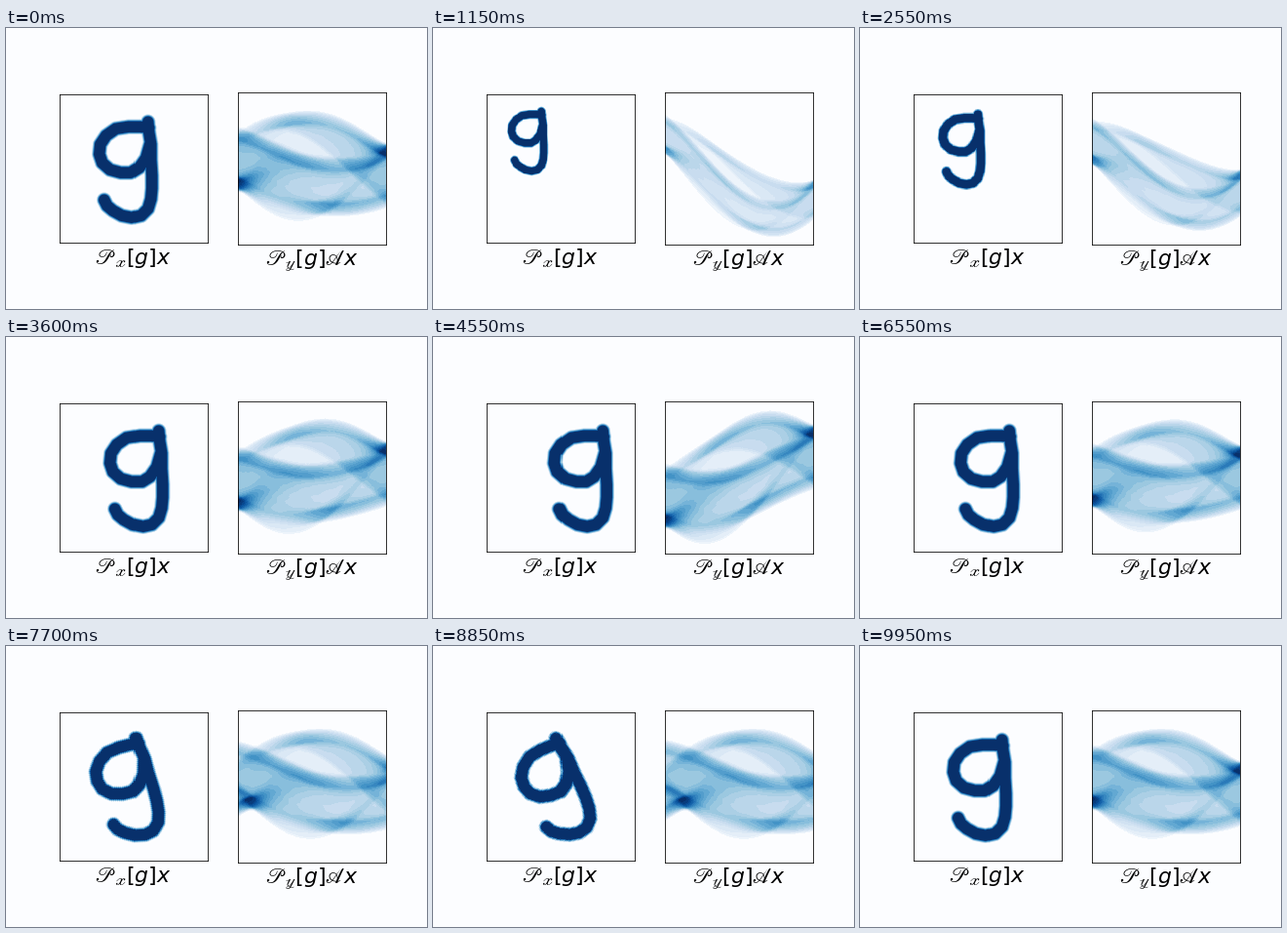
Recreate the animation shown at these times as a matplotlib script. Size 432 px wide and 288 px high, loop 10 s.

```python
import numpy as np
import matplotlib.pyplot as plt
from matplotlib.animation import FuncAnimation
from matplotlib.colors import ListedColormap, to_rgba

W, H, DPI = 432, 288, 72
FRAMES, INTERVAL = 200, 50
PAPER = "#fcfdff"
N, ROWS = 152, 156            # image side, detector rows
HALF = N / 2
STEP = 0.5                    # spacing of the fine glyph grid
ANG0, ANG_STEP = -40, 0.5     # first angle and spacing of the base sinogram
U_MAX = 110
CENTER = np.array([131, 143.5])

plt.rcParams["mathtext.fontset"] = "dejavusans"

BOWL = [(146, 103), (137, 102), (126, 102), (113, 104), (103, 111),
        (97, 120), (96, 130), (99, 139), (107, 146), (118, 149),
        (128, 149), (136, 144), (143, 134), (147, 120)]
STEM = [(145, 97), (146, 108), (148, 120), (148, 136), (149, 152),
        (149, 165), (148, 176), (145, 186), (138, 193), (129, 195),
        (119, 193), (110, 188), (104, 183), (101, 177)]


def seg_dist(x, y, p, q):
    """Distance from every point (x, y) to the segment p-q."""
    d = q - p
    k = ((x - p[0]) * d[0] + (y - p[1]) * d[1]) / (d @ d)
    k = np.clip(k, 0, 1)
    return np.hypot(x - p[0] - k * d[0], y - p[1] - k * d[1])


def draw_glyph(radius=6.7, soft=3.0):
    side = np.arange(-HALF, HALF, STEP) + STEP / 2
    x, y = np.meshgrid(side, side)
    dist = np.full(x.shape, 1e3)
    for path in (BOWL, STEM):
        pts = np.array(path) - CENTER
        for p, q in zip(pts[:-1], pts[1:]):
            dist = np.minimum(dist, seg_dist(x, y, p, q))
    return x, y, np.clip((radius - dist) / soft + 0.5, 0, 1)


def project(x, y, value):
    """Parallel-beam projections of the glyph, one column per angle."""
    on = value > 0
    x, y, w = x[on], y[on], value[on] * STEP**2
    angles = np.radians(np.arange(ANG0, 180 + ANG_STEP, ANG_STEP))
    size = 2 * U_MAX + 1
    out = np.zeros((size, len(angles)))
    for i, t in enumerate(angles):
        u = x * np.cos(t) - y * np.sin(t) + U_MAX
        low = np.floor(u).astype(int)
        f = u - low
        out[:, i] = (np.bincount(low, w * (1 - f), size)
                     + np.bincount(low + 1, w * f, size))
    return out / out.max()


GX, GY, GLYPH = draw_glyph()
BASE = project(GX, GY, GLYPH)

PX, PY = np.meshgrid(np.arange(N) - HALF + 0.5, np.arange(N) - HALF + 0.5)
THETA = np.linspace(0, 180, N)
U = (np.arange(ROWS) - ROWS / 2 + 0.5)[:, None]


def pose(i):
    """Scale, shift and rotation (degrees) of the glyph."""
    k = np.interp(i, [0, 30, 59], [0, 30, 0])
    scale = 1 - 0.132 * np.cbrt(k)
    slide = np.interp(i, [60, 100, 139], [0, 36.5, 0])
    turn = np.interp(i, [139, 170, 199], [0, 30, 0])
    corner = (scale - 1) * HALF          # scaling keeps the top-left corner
    return scale, corner + slide, corner, turn


def move_glyph(scale, tx, ty, turn):
    c, s = np.cos(np.radians(turn)), np.sin(np.radians(turn))
    x, y = (PX - tx) / scale, (PY - ty) / scale
    col = np.floor((x * c - y * s + HALF) / STEP).astype(int)
    row = np.floor((x * s + y * c + HALF) / STEP).astype(int)
    n = len(GLYPH)
    inside = (col >= 0) & (col < n) & (row >= 0) & (row < n)
    return np.where(inside, GLYPH[row.clip(0, n - 1), col.clip(0, n - 1)], 0)


def move_sinogram(scale, tx, ty, turn):
    t = np.radians(THETA)
    u = (U - tx * np.cos(t) + ty * np.sin(t)) / scale + U_MAX
    u = u.clip(0, 2 * U_MAX - 1)
    low = np.floor(u).astype(int)
    f = u - low
    col = np.rint((THETA - turn - ANG0) / ANG_STEP).astype(int)[None, :]
    return scale * (BASE[low, col] * (1 - f) + BASE[low + 1, col] * f)


def blues(levels):
    colors = plt.get_cmap("Blues")(np.linspace(0, 1, levels))
    colors[0] = to_rgba(PAPER)
    return ListedColormap(colors)


fig = plt.figure(figsize=(W / DPI, H / DPI), dpi=DPI, facecolor=PAPER)


def panel(x, y, w, h, label, levels):
    ax = fig.add_axes([x / W, 1 - (y + h) / H, w / W, h / H], facecolor=PAPER)
    image = ax.imshow(np.zeros((h, w)), cmap=blues(levels), vmin=0, vmax=1,
                      aspect="auto", interpolation="nearest")
    ax.set_xticks([])
    ax.set_yticks([])
    ax.set_xlabel(label, fontsize=22)
    return image


glyph = panel(54.5, 67.5, N, N, r"$\mathscr{P}_{\mathscr{x}}[g]x$", 64)
sino = panel(237.5, 65.5, N, ROWS,
             r"$\mathscr{P}_{\mathscr{y}}[g]\mathscr{A}x$", 22)


def update(i):
    p = pose(i)
    glyph.set_data(move_glyph(*p))
    sino.set_data(move_sinogram(*p))
    return glyph, sino


anim = FuncAnimation(fig, update, frames=FRAMES, interval=INTERVAL,
                     repeat=True, repeat_delay=0)
plt.show()
```
